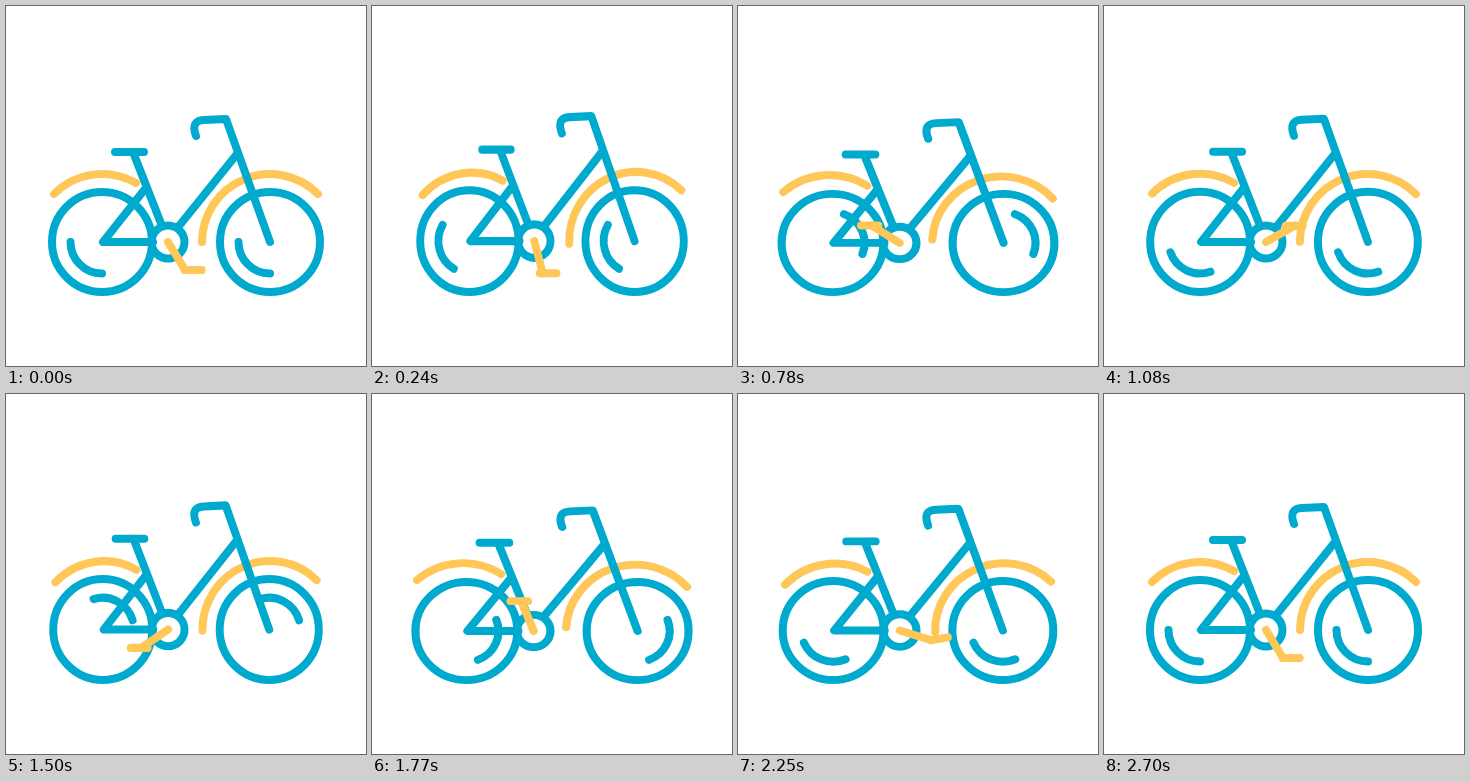
Animation, 360 px wide and 360 px high, one loop 4730 ms. Source, as an HTML page:

```html
<!DOCTYPE html>
<html lang="en">
<head>
<meta charset="utf-8">
<title>Bicycle</title>
<style>
  html, body { margin: 0; width: 100%; height: 100%; overflow: hidden; background: #fff; }
  svg { display: block; width: 100%; height: 100%; }
  path, circle { fill: none; stroke: #00a9ce; stroke-width: 8; stroke-linecap: round; stroke-linejoin: round; }
  .warm path { stroke: #ffc658; }
</style>
</head>
<body>
<svg viewBox="0 0 360 360">
  <g id="bike">
    <g class="warm">
      <path id="rearGuard" d="M48 188A68 68 0 0 1 130 177"/>
      <path id="frontGuard" d="M196 236A68 68 0 0 1 312 188"/>
    </g>
    <circle cx="96" cy="236" r="50"/>
    <circle cx="264" cy="236" r="50"/>
    <path id="rearShine" d="M64.5 236A31.5 31.5 0 0 0 96 267.5"/>
    <path id="frontShine" d="M232.5 236A31.5 31.5 0 0 0 264 267.5"/>
    <path d="M109 146H138M127 146L156 220M139 183L97 236H147M173 220L231 148"/>
    <path d="M190 130C186 119 189 114.5 198 114L220 113L264 236"/>
    <circle cx="162" cy="236" r="16.5"/>
    <g class="warm">
      <path id="crank"/>
      <path id="pedal" d="M-8.5 0H8.5"/>
    </g>
  </g>
</svg>
<script>
const LOOP = 4730, RIDE = 2700, STEP = 30;
const $ = id => document.getElementById(id);
const set = (id, value) => $(id).setAttribute('transform', value);
const smooth = p => p * p * (3 - 2 * p);

// [time, value] keys; the second set keeps the guards swinging a little longer
const stretchKeys = [[0, 0], [360, 4], [840, -3.5], [1320, 4], [1800, -3.5], [2700, 0]];
const swingKeys = [[0, 0], [360, -3], [840, 3.4], [1320, -3], [1800, 3.4], [2250, -1.5], [2700, 0]];
const tiltKeys = [[0, 0], [1800, 0], [2250, -10], [2700, 0]];

function track(keys, t) {
  const i = keys.findIndex(k => k[0] >= t);
  if (i < 1) return keys[0][1];
  const [t0, a] = keys[i - 1], [t1, b] = keys[i];
  return a + (b - a) * smooth((t - t0) / (t1 - t0));
}

function bezier(x1, y1, x2, y2) {
  const at = (a, b, u) => 3 * u * (1 - u) ** 2 * a + 3 * u * u * (1 - u) * b + u ** 3;
  return x => {
    if (x <= 0 || x >= 1) return x <= 0 ? 0 : 1;
    let lo = 0, hi = 1;
    for (let i = 0; i < 24; i++) {
      const mid = (lo + hi) / 2;
      if (at(x1, x2, mid) < x) lo = mid; else hi = mid;
    }
    return at(y1, y2, lo);
  };
}
const wheelEase = bezier(.37, .1, .46, 1);
const crankEase = bezier(.34, 0, .6, 1);

function draw(t) {
  const p = t / RIDE;

  const s = track(stretchKeys, t) / 180;
  set('bike', `translate(180 289.5) scale(${1 - s} ${1 + s}) translate(-180 -289.5)`);

  const swing = track(swingKeys, t);
  set('rearGuard', `rotate(${swing} 115 178)`);
  set('frontGuard', `rotate(${swing} 260 198)`);

  const spin = 720 * wheelEase(p);
  set('rearShine', `rotate(${spin} 96 236)`);
  set('frontShine', `rotate(${spin} 264 236)`);

  // The pedal slides forward on its axle while the crank points ahead
  const angle = (58.7 + 720 * crankEase(p)) * Math.PI / 180;
  const x = 162 + 32.8 * Math.cos(angle), y = 236 + 32.8 * Math.sin(angle);
  const ahead = Math.max(0, Math.cos(angle - .67));
  $('crank').setAttribute('d', `M162 236L${x} ${y}`);
  set('pedal', `translate(${x} ${y}) rotate(${track(tiltKeys, t)}) translate(${11.5 * ahead ** 2 - 2} 0)`);
}

const start = performance.now();
function tick() {
  const t = (performance.now() - start) % LOOP;
  draw(Math.min(RIDE, Math.floor(t / STEP) * STEP));
  requestAnimationFrame(tick);
}
tick();
</script>
</body>
</html>
```
